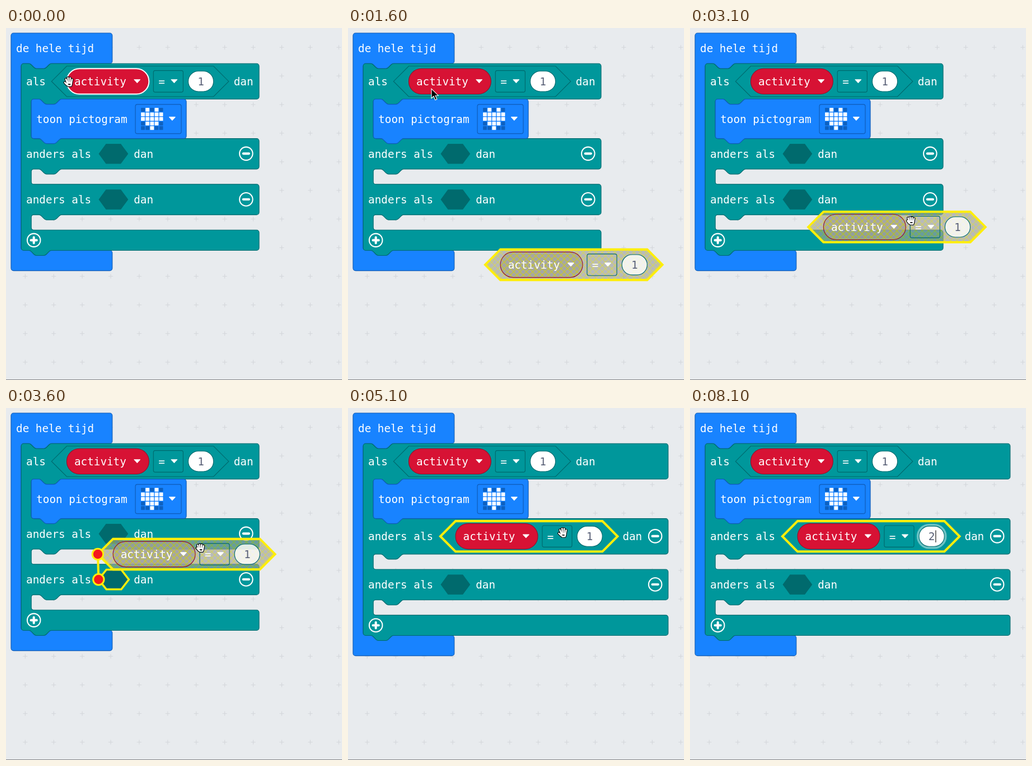
An HTML page for the animation above (8.2 s loop, 600 by 626 pixels).

```html
<!DOCTYPE html>
<html lang="nl">
<head>
<meta charset="utf-8">
<title>Blokken dupliceren</title>
<style>
  html, body { margin: 0; width: 100%; height: 100%; overflow: hidden; background: #e8ebee; }
  svg { display: block; width: 100%; height: 100%; }
  text { font: 17.07px "DejaVu Sans Mono", "Liberation Mono", monospace; fill: #fff; white-space: pre; }
  .mid { text-anchor: middle; }
  .blue { fill: #1883ff; stroke: #0f5bb5; }
  .teal { fill: #00979b; stroke: #00696d; }
  .red { fill: #d71234; stroke: #97102a; }
  .hole { fill: #006a6d; }
  .num { fill: #fff; stroke: #00696d; }
  .dark { fill: #575e75; }
  .arrow { fill: #fff; stroke: #fff; stroke-linejoin: round; }
  .ring { fill: none; stroke: #fff; stroke-width: 1.8; }
  .sign { stroke: #fff; stroke-width: 3.6; stroke-linecap: round; }
  .select { fill: none; stroke: #ffee0a; stroke-width: 3.6; }
  .off .teal.hex { fill: url(#hatch); fill-opacity: .65; }
  .off .red { fill: url(#hatch); fill-opacity: .75; }
  .off .op { fill: none; }
  .off .num { fill-opacity: .8; }
  #menu text { font: 16.35px "Liberation Sans", Arial, sans-serif; fill: #000; }
</style>
</head>
<body>
<svg viewBox="0 0 600 626" preserveAspectRatio="none">
  <defs>
    <pattern id="grid" x="8.9" y="8.9" width="50.9" height="50.9" patternUnits="userSpaceOnUse">
      <path d="M21.4,25.4h8M25.4,21.4v8" stroke="#d3d6da" stroke-width="1.1"/>
    </pattern>
    <pattern id="hatch" width="10" height="10" patternUnits="userSpaceOnUse">
      <rect width="10" height="10" fill="#9f9f9f"/>
      <path d="M0,0L10,10M10,0L0,10" stroke="#cc0" stroke-width="1"/>
    </pattern>
  </defs>
  <rect width="600" height="626" fill="#e8ebee"/>
  <rect width="600" height="626" fill="url(#grid)"/>
  <rect y="625" width="600" height="1" fill="#808285"/>
  <g id="blocks" transform="translate(9 9) scale(1.13)"></g>
  <g id="link">
    <g id="target" class="select" stroke-width="4"><path d="M0,0L14,-17.5H40.5L54,0L40.5,17.5H14z"/></g>
  </g>
  <g id="copy"></g>
  <g id="dots" fill="#f5191c" stroke="#ffee0a" stroke-width="3">
    <path id="wire" stroke-width="4"/>
    <circle id="dotA" r="9.7"/>
    <circle id="dotB" r="9.7"/>
  </g>
  <g id="menu">
    <rect x="100.5" y="96" width="176" height="197" rx="3" fill="#000" opacity=".15"/>
    <rect x="99.5" y="94.5" width="175.5" height="196.5" rx="2.5" fill="#fdfdfe" stroke="#b9bcbf"/>
    <text x="119" y="126">Dupliceren</text>
    <text x="119" y="175">Reactie toevoegen</text>
    <text x="119" y="224.5">Verwijder blokken</text>
    <text x="119" y="273.5">Help</text>
  </g>
  <g id="cursor">
    <path id="pointer" d="M0,0V17L4,13.3L6.8,20L9.8,18.7L7,12.2H12.3z" fill="#000" stroke="#fff" stroke-width="1.1"/>
    <g id="open"></g>
    <g id="grip"></g>
    <g id="beam" fill="none"></g>
  </g>
</svg>
<script>
const $ = id => document.getElementById(id);
const show = (id, on) => { $(id).style.display = on ? '' : 'none'; };
const place = (id, x, y, extra = '') => $(id).setAttribute('transform', `translate(${x} ${y})${extra}`);

// Connector tab, drawn rightwards and leftwards
const TAB_R = 'c2,0 3,1 4,2l4,4c1,1 2,2 4,2h12c2,0 3,-1 4,-2l4,-4c1,-1 2,-2 4,-2';
const TAB_L = 'c-2,0 -3,1 -4,2l-4,4c-1,1 -2,2 -4,2h-12c-2,0 -3,-1 -4,-2l-4,-4c-1,-1 -2,-2 -4,-2';
const HEX = 'M24,0h232l24,24l-24,24h-232l-24,-24z';

// Block outline; odd rows are open statement slots
function block(cls, x, y, w, rows, tabs) {
  let d = 'M0,4a4,4 0 0 1 4,-4' + (tabs ? 'H12' + TAB_R : '') + `H${w - 4}`;
  rows.forEach((h, i) => {
    d += i % 2
      ? `H64${TAB_L}h-8a4,4 0 0 0 -4,4v${h - 8}a4,4 0 0 0 4,4H${w - 4}`
      : `a4,4 0 0 1 4,4v${h - 8}a4,4 0 0 1 -4,4`;
  });
  d += (tabs ? 'H48' + TAB_L : '') + 'H4a4,4 0 0 1 -4,-4z';
  return `<path class="${cls}" transform="translate(${x} ${y})" d="${d}"/>`;
}

const label = (x, y, s, cls = '') => `<text class="${cls}" x="${x}" y="${y + 6.2}">${s}</text>`;
const box = (cls, x, y, w, h, r, more = '') =>
  `<rect class="${cls}" x="${x}" y="${y}" width="${w}" height="${h}" rx="${r}" ${more}/>`;
const arrow = (x, y) => `<path class="arrow" d="M${x - 4.7},${y - 2.8}h9.4l-4.7,5z"/>`;
const hole = y => `<path class="hole" d="M138.5,${y}l11.5,-15.7h23.5l11.7,15.7l-11.7,15.7h-23.5z"/>`;
const button = (x, y, plus) =>
  `<circle class="ring" cx="${x}" cy="${y}" r="10.4"/><path class="sign" d="M${x - 4.5},${y}h9${plus ? 'm-4.5,-4.5v9' : ''}"/>`;

// Comparison block: variable, operator, number
function compare(x, y, editing) {
  const value = editing
    ? box('', 216, 8, 40, 32, 16, 'id="halo" fill="none" stroke="#fff" stroke-opacity=".42" stroke-width="7.5"') +
      box('num', 216, 8, 40, 32, 16) +
      box('', 230.5, 14, 10.6, 20, 0, 'id="mark" fill="#c9cbcd"') +
      '<text id="value" class="dark mid" x="236" y="30.2"></text>' +
      '<path id="caret" d="M242.4,14.5v19" stroke="#222" stroke-width="1.1"/>'
    : box('num', 216, 8, 40, 32, 16) + label(236, 24, '1', 'dark mid');
  return `<g transform="translate(${x} ${y})"><path class="teal hex" d="${HEX}"/>` +
    box('red', 24, 4, 130, 40, 20) + label(36, 24, 'activity') + arrow(135.3, 24) +
    box('teal op', 161, 7, 47, 34, 3) + label(174, 24.3, '=', 'mid') + arrow(193.8, 24) +
    value + '</g>';
}

function heart() {
  let s = '';
  ['01010', '11111', '11111', '01110', '00100'].forEach((row, j) => [...row].forEach((c, i) => {
    s += box('', 205.4 + i * 7.2, 117.7 + j * 7.2, 6, 6, .6, `fill="${c > 0 ? '#fff' : '#0d60bf'}"`);
  }));
  return s;
}

function program(id, w, d) {
  const mid = 190 + d / 2, low = 262 + d, bx = w - 4.5;
  return `<g id="${id}">` +
    block('blue', 0, 0, 160, [48, 294 + d, 32]) +
    block('teal', 16, 48, w, [56, 62, 48 + d, 24, 48, 24, 32], true) +
    block('blue', 32, 104, 245, [62], true) +
    label(8, 24, 'de hele tijd') +
    label(24, 76, 'als') + compare(64, 52) + label(352, 76, 'dan') +
    label(40, 135, 'toon pictogram') + box('blue', 196.5, 112.3, 72.5, 46, 3) + heart() + arrow(254.7, 135) +
    label(24, mid, 'anders als') +
    (d ? compare(138, 170, true) + `<path class="select" transform="translate(138 170)" d="${HEX}"/>` + label(426, mid, 'dan')
       : hole(mid) + label(194, mid, 'dan')) +
    button(bx, mid - .3) +
    label(24, low, 'anders als') + hole(low) + label(194, low, 'dan') + button(bx, low - .3) +
    button(36, 326 + d, true) + '</g>';
}

$('blocks').innerHTML = program('before', 376, 0) + program('after', 482, 8) +
  box('', 88, 56, 130, 40, 20, 'id="hover" fill="none" stroke="#fff" stroke-width="1.8"') +
  `<path id="chosen" class="select" transform="translate(64 52)" d="${HEX}"/>`;
$('copy').innerHTML = `<g class="off">${compare(0, 0)}</g><path class="select" d="${HEX}"/>`;

const inked = (d, outer, inner) =>
  `<g fill="none" stroke-linecap="round" stroke-linejoin="round"><path d="${d}" stroke="#000" stroke-width="${outer}"/>` +
  `<path d="${d}" stroke="#fff" stroke-width="${inner}"/></g>`;
const PALM = 'M-3,3.5L-1,6.5H4L5,2H-2z';
$('open').innerHTML = inked('M-5,-5L-2.5,2M-1.3,-7.5L-.7,1M2.5,-7.2L2.2,1M6,-4.5L4.7,3M-7,1L-3,5' + PALM, 4.8, 2.6);
$('grip').innerHTML = inked('M-4.6,-4L-3.5,1M-1.2,-5L-.7,1M2.4,-4.6L2.2,1M5.8,-3L4.7,3M-6,1L-3,5' + PALM, 4.8, 2.6);
const BEAM = 'M-3.5,-9.5Q0,-9.5 0,-7V7Q0,9.5 -3.5,9.5M3.5,-9.5Q0,-9.5 0,-7M3.5,9.5Q0,9.5 0,7M-2,3h4';
$('beam').innerHTML = `<path d="${BEAM}" stroke="#fff" stroke-width="3"/><path d="${BEAM}" stroke="#000" stroke-width="1.3"/>`;

// Pointer stops: time, x, y
const STOPS = [
  [0, 112, 96], [100, 112, 96], [500, 100.5, 94], [1000, 100.5, 94], [1400, 149, 108],
  [1600, 149, 108], [2480, 428, 409], [2700, 428, 409], [3600, 347, 248], [4400, 352, 218.5],
  [4800, 352, 218.5], [5500, 432, 227], [8200, 432, 227]
];
function pointerAt(t) {
  const i = STOPS.findIndex((s, n) => n && t <= s[0]);
  const [a, b] = [STOPS[i - 1], STOPS[i]];
  const f = (t - a[0]) / (b[0] - a[0]), k = f * f * (3 - 2 * f);
  return [a[1] + (b[1] - a[1]) * k, a[2] + (b[2] - a[2]) * k];
}

const LOOP = 8200, STEP = 100;
const MENU = 600, COPY = 1600, GRAB = 2700, SWITCH = 4000, DROP = 4500, EDIT = 5700, TYPE = 6900;

function draw(t) {
  const [x, y] = pointerAt(t);
  const copied = t >= COPY && t < DROP, dragging = t >= GRAB && t < DROP;
  show('before', t < DROP);
  show('after', t >= DROP);
  show('hover', t < 300);
  show('chosen', t >= MENU && t < COPY);
  show('menu', t >= MENU && t < COPY);

  const bx = dragging ? x - 183 : 245, by = dragging ? y + 12 : 421;
  show('copy', copied);
  place('copy', bx, by - 27.1, ' scale(1.13)');

  const tx = 165.3, ty = t < SWITCH ? 305 : 223.7;
  const linked = dragging && Math.hypot(bx - tx, by - ty) < 56;
  show('link', linked);
  show('dots', linked);
  place('target', tx, ty);
  place('dotA', tx, ty);
  place('dotB', bx, by);
  $('wire').setAttribute('d', `M${tx},${ty}L${bx},${by}`);

  const typed = t >= TYPE;
  show('halo', t >= EDIT);
  show('mark', t >= EDIT && !typed);
  show('caret', typed && (t - TYPE) % 1000 < 500);
  $('value').textContent = typed ? '2' : '1';

  const shape = typed ? '' : t >= 5400 ? 'beam' : dragging ? 'grip'
    : t < 400 || t >= 2400 ? 'open' : 'pointer';
  for (const id of ['pointer', 'open', 'grip', 'beam']) show(id, id === shape);
  place('cursor', x, y);
}

function tick() {
  draw(Math.floor(performance.now() % LOOP / STEP) * STEP);
  requestAnimationFrame(tick);
}
tick();
</script>
</body>
</html>
```
